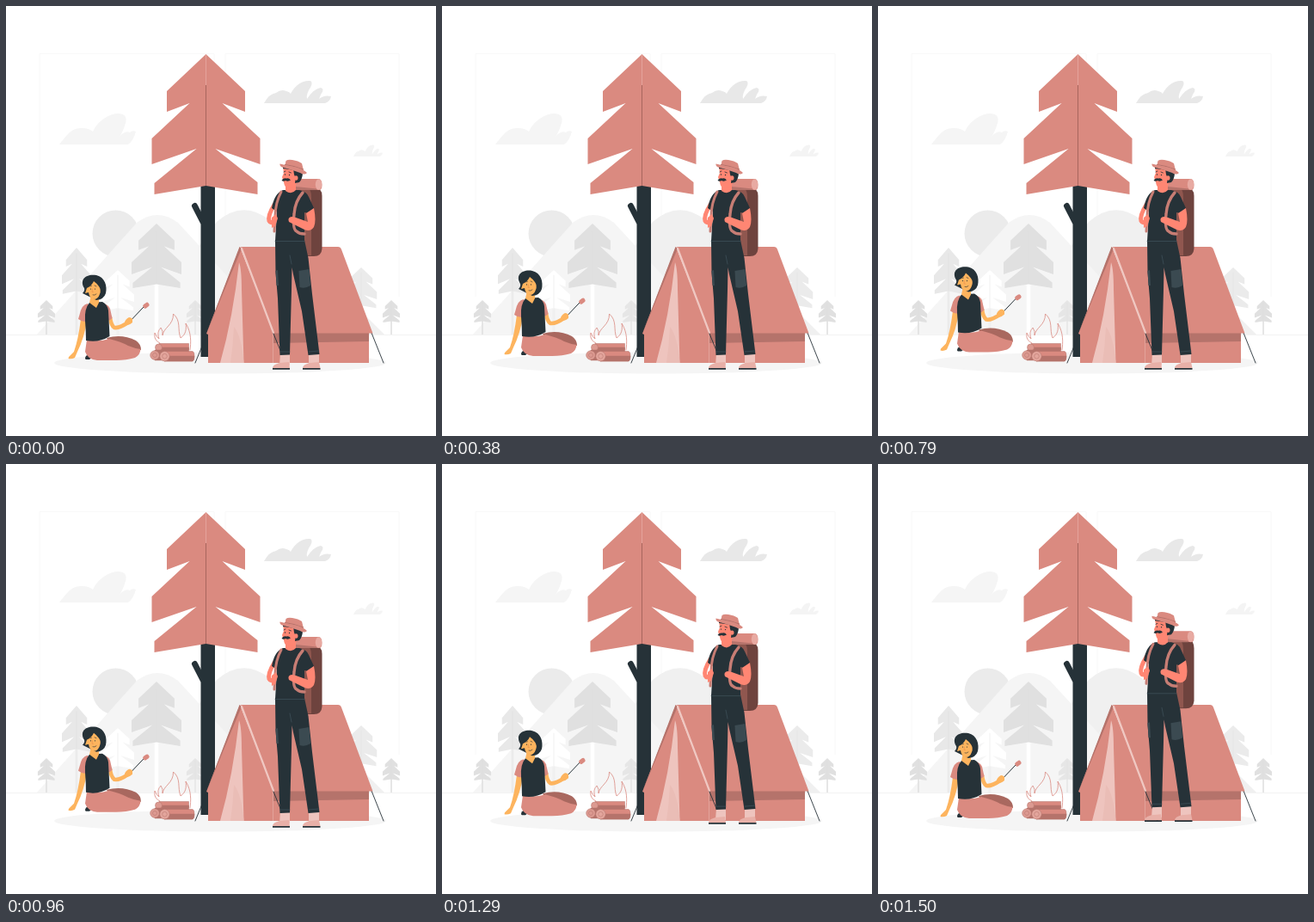
Write an HTML page that moves like this. It is 500 px wide and 500 px high and loops after 1.54 s.

```html
<!DOCTYPE html>
<html lang="en">
<head>
<meta charset="utf-8">
<title>Camping</title>
<style>
html, body { margin: 0; width: 100%; height: 100%; overflow: hidden; background: #fff; }
svg { display: block; width: 100%; height: 100%; }
.pink { fill: #da8a80; }
.deep { fill: #b5736b; }
.pale { fill: #eec4be; }
.dark { fill: #263238; }
.tan { fill: #fdb45e; }
.skin { fill: #ff8673; }
.line { fill: none; stroke-linecap: round; stroke-linejoin: round; }
</style>
</head>
<body>
<svg viewBox="0 0 500 500">
<defs>
  <path id="fir" d="M0 0L45.500 43V67L19 57L63 98V128L11 110L60 149V163L0 153L-60 163V150L-11 110L-63 128V98L-19 57L-45.500 67V43Z"/>
  <path id="puff" d="M0 0Q6 -11 14 -12Q20 -17 26 -14Q30 -13 31 -11C36 -21 45 -27 54 -26Q58 -24 52 -15Q49 -9 50 -5Q58 -17 66 -18Q71 -17 66 -10L64 -5Q70 -10 78 -8Q77 -2 71 0Z"/>
</defs>

<!-- backdrop -->
<path class="line" d="M39 338V55.500H242V338M255 338V55.500H457V338" stroke="#f8f8f8"/>
<path d="M62 161L70 151Q78 141 89 142Q96 142 101 146C107 133 120 125 131 125Q142 126 139 136Q136 147 131 153Q138 144 144 147Q147 144 151 146Q148 157 142 161Z" fill="#f5f5f5"/>
<use href="#puff" transform="translate(300 113)" fill="#e8e8e8"/>
<use href="#puff" transform="translate(404 175) scale(.435 .52)" fill="#f4f4f4"/>
<circle cx="127.500" cy="264.500" r="27" fill="#ebebeb"/>
<path d="M150 382L245 251Q276 224 308 250L440 382Z" fill="#f0f0f0"/>
<path d="M36 382L152 252Q176 234 200 252L320 382Z" fill="#f5f5f5"/>
<path d="M0 382.500H500" stroke="#f0f0f0" stroke-width=".8"/>
<g id="grove"></g>
<ellipse cx="249" cy="415" rx="193" ry="12.500" fill="#f5f5f5"/>

<!-- big tree -->
<path class="line" d="M219.500 232.500L229 251" stroke="#263238" stroke-width="7"/>
<path class="dark" d="M226.500 205H243V408H226.500Z"/>
<use href="#fir" class="pink" x="232.500" y="56"/>
<path d="M232.500 57V92" stroke="#e6aaa2" stroke-width=".8"/>
<path d="M232.500 92V209" stroke="#a3625a" stroke-width=".9"/>

<!-- tent -->
<g>
  <path class="line" d="M234 381L220 415M425 380L439 415" stroke="#263238" stroke-width=".9"/>
  <path class="pink" d="M311 380H422V415H311Z"/>
  <path class="deep" d="M310 379H422V390L311 392Z"/>
  <path class="pink" d="M273 280H386Q389 280 390 283L426.500 380.500H311Z"/>
  <path class="pink" d="M272 280L311 380V415H235V382L233 381Z"/>
  <path class="deep" d="M271.500 280L233 381L274 282Z"/>
  <path class="pale" d="M271 298Q274 306 274 330L276.500 415H249Q264 362 271 298Z"/>
  <path d="M265 373Q264 395 261 415H276.500Q274 384 265 373Z" fill="#eabdb6"/>
  <path class="line" d="M274 282L311 380" stroke="#f0c8c2" stroke-width="2.200"/>
  <path d="M310.500 381V415" stroke="#e5aaa2" stroke-width=".8"/>
  <path class="line" d="M311 381L325 415" stroke="#263238" stroke-width=".9"/>
</g>

<!-- fire -->
<path class="line" d="M179 392C171 388 173 382 173 380Q175 385 178 387C175 378 179 376 180 374Q183 378 182 383C183 374 195 371 194.500 358C204 366 199 376 203 386C209 382 210 376 209 369C216 380 215 392 214 400" stroke="#da8a80" stroke-width=".8"/>
<g stroke="#b5736b" stroke-width=".5">
  <path class="pink" d="M178 392.500H212.500V400H178Z"/>
  <path class="deep" d="M178 397H212.500V402H178Z"/>
  <circle cx="177.500" cy="397" r="4" fill="#dc9a91"/>
  <path class="deep" d="M173 400H186V412H173Z"/>
  <circle cx="173" cy="406" r="5.300" fill="#dc9a91"/>
  <path class="pink" d="M184 401.500H217Q219 402 219 407T217 413H184Z"/>
  <path class="deep" d="M184 407H219Q219 412 217 413H184Z"/>
  <circle cx="184.500" cy="407.200" r="5.700" fill="#e3a59c"/>
  <circle cx="184.500" cy="407.200" r="2.800" fill="none"/>
  <circle cx="173" cy="406" r="2.500" fill="none"/>
</g>

<!-- seated camper -->
<g id="woman">
  <path class="dark" d="M98 403L93 407Q91 410 93 411L97 411L103 406Z"/>
  <path d="M117 386Q135 381 151 389Q157 393 157 400L125 400Z" fill="#a9685f"/>
  <path class="pink" d="M94 388Q108 391 120 387Q133 390 142 395Q149 398 156.500 399Q156 406 150 409Q140 412 128 412H106Q95 411 92 402Z"/>
  <path class="tan" d="M87 364L94 366Q91 386 83 402L80 409Q76 411 72.500 410L73 408L79 402Q84 388 87 364Z"/>
  <path class="pink" d="M95 346Q88 347 85.500 359L84 364Q89 368 95 367L98 350Z"/>
  <path class="line" d="M121 362Q122 371 126 374Q132 375 142 368" stroke="#fdb45e" stroke-width="4.600"/>
  <path class="pink" d="M113 346Q119 347 121 352L123.500 363Q120 367 116 365Z"/>
  <path class="dark" d="M97 345L112 344Q118 347 119 354L120.500 384Q108 392 93 389Q93 378 92 366Q91 352 97 345Z"/>
  <path class="tan" d="M99 336H108V345L105 351L97 345Z"/>
  <path class="dark" d="M89 334Q92 331 91 328C85 318 93 311 105 313C115 315 118 326 116 334Q114 341 105 342Z"/>
  <path class="tan" d="M94 328Q100 325 102 320Q105 322 108 326Q111 330 109 335Q107 341 102 341Q97 340 96 333L92 334Z"/>
  <path class="line" d="M98 326L99.500 325.500M103 325L105 326M101 336Q103 337 105 335" stroke="#263238" stroke-width=".6"/>
  <circle cx="98.500" cy="329" r=".6" class="dark"/>
  <circle cx="103.500" cy="329" r=".6" class="dark"/>
  <path class="line" d="M100.500 329L100 332.500H101.500" stroke="#e58445" stroke-width=".5"/>
  <path class="line" d="M141 370L160 350" stroke="#263238" stroke-width="1"/>
  <path class="tan" d="M138 367Q141 362 144 362L147 363.500L147 368Q143 372 139 371Z"/>
  <rect class="pink" x="159" y="345.500" width="7.600" height="5.200" rx="2.200" transform="rotate(-36 163 348)"/>
</g>

<!-- hiker -->
<g id="man">
  <path d="M337 210H358Q367.500 211 367.500 221V282Q367 291 358 291H337Z" fill="#6e433e"/>
  <path d="M337 210H349Q355 213 355 222V290H337Z" fill="#90574f"/>
  <path class="pink" d="M336 201H364Q367.500 202 367.500 208T364 214L336 211Z"/>
  <ellipse cx="363.500" cy="207.500" rx="3.700" ry="6.300" fill="#e8aaa2"/>
  <path class="deep" d="M337 210L361 212.500V214H337Z"/>

  <!-- shoes and trousers -->
  <path class="pale" d="M319 404H330V418H318ZM352 404H364V418H352Z"/>
  <path fill="#e8b0a8" d="M310 421Q310 417 318 415L329 414L330 421ZM345 421Q345 417 353 415L364 414L365.500 421Z"/>
  <path class="dark" d="M310 421H330V422.700H310ZM345 421H365.500V422.700H345Z"/>
  <path class="dark" d="M313 272H347L351.500 293L356 335L364.500 405L351.500 406L344 355L334 312L332.500 304L332 330L330 405.500L318.500 406L316 340L313.500 310Z"/>
  <path d="M340.500 308L352.500 306L354 325Q348 329 341.500 327ZM313.500 308L316 307L317 325L314.500 325Z" fill="#3b4a51"/>
  <path class="line" d="M332 300L330 290M319 402H330M352 402L364 401" stroke="#455a64" stroke-width=".6"/>

  <!-- torso -->
  <path class="line" d="M312 231Q304 244 306 250Q308 254 312 249" stroke="#ff8673" stroke-width="5"/>
  <path class="dark" d="M322 214H341Q350 216 352 222L358 235L351 241L347 240L347 274H313L315 239L309 235Q312 218 322 214Z"/>
  <path class="skin" d="M325 204H337V214Q332 220 325 215Z"/>
  <path class="line" d="M320 216Q313 229 313 245L312 262" stroke="#c77d74" stroke-width="3"/>
  <path class="line" d="M345 217Q336 227 335 242Q333 260 338 262Q341 265 347 265" stroke="#c77d74" stroke-width="3.400"/>
  <path class="skin" d="M309 246L314 242L316 247L313 256L309 258Z"/>
  <path class="skin" d="M349 241L358 235Q361 250 358 257Q354 263 347 260L329 251Q327 246 332 245L337 246L351 251Z"/>
  <path class="line" d="M313 273.500H347" stroke="#455a64" stroke-width=".6"/>

  <!-- head -->
  <path class="skin" d="M322 187H339V204Q336 212 329 212Q324 212 323 205L321 199L323 194Z"/>
  <path class="dark" d="M334 189L345 193Q345 201 341 205L336 206Q337 199 335 196Z"/>
  <ellipse class="skin" cx="337.300" cy="200" rx="2.200" ry="2.700"/>
  <path class="dark" d="M320.500 203Q322 199.500 326 200.500Q329 199.500 331 202.500Q328 204.500 325 203Q323 204.500 320.500 203Z"/>
  <path class="line" d="M323 193L325 192M329 193L331.500 194" stroke="#263238" stroke-width=".8"/>
  <circle class="dark" cx="324.500" cy="196" r=".7"/>
  <circle class="dark" cx="329.500" cy="196.500" r=".7"/>
  <path class="dark" d="M322 186L336 189V191L322 189Z"/>
  <path class="pink" d="M324 187L325.500 180Q328 178 333 179Q340 180 344 183L346.500 193Z"/>
  <path class="line" d="M324.500 184.500Q336 186 345.500 190" stroke="#b5736b" stroke-width="1.200"/>
  <path class="pink" d="M318.500 183.500Q327 185.500 337 187.500Q346 190 350 194Q347 197 342 194Q330 189.500 321 187.500Q318 186 318.500 183.500Z"/>
</g>
</svg>
<script>
const LOOP = 1540, HALF = 750, RISE = 10, DELAY = 1000;
const $ = id => document.getElementById(id);

// x, tip y, x scale, y scale, crown colour, trunk colour
const firs = [
  [82, 281, .27, .33, '#e8e8e8', '#ebebeb'],
  [130, 307, .3, .29, '#fff', '#f0f0f0'],
  [175, 253, .46, .46, '#e0e0e0', '#fff'],
  [47, 342, .16, .16, '#e0e0e0', '#e0e0e0'],
  [220, 342, .16, .16, '#e6e6e6', '#e6e6e6'],
  [413, 304, .29, .29, '#ebebeb', '#ebebeb'],
  [448, 342, .16, .16, '#e0e0e0', '#e0e0e0']
];
$('grove').innerHTML = firs.map(([x, y, sx, sy, crown, trunk]) => {
  const w = 10 * sx, top = y + 140 * sy;
  return `<rect x="${x - w / 2}" y="${top}" width="${w}" height="${382 - top}" fill="${trunk}"/>
    <use href="#fir" transform="translate(${x} ${y}) scale(${sx} ${sy})" fill="${crown}"/>
    <path d="M${x} ${y + 20 * sy}V${y + 152 * sy}" stroke="#d8d8d8" stroke-width=".4"/>`;
}).join('');

// linear rise and fall
const lift = t => -RISE * Math.max(0, 1 - Math.abs(t - HALF) / HALF);
const shift = (id, y) => $(id).setAttribute('transform', `translate(0 ${y})`);

function draw(t) {
  shift('woman', lift(t));
  shift('man', lift(t - DELAY));
}

const start = performance.now();
function tick() {
  draw((performance.now() - start) % LOOP);
  requestAnimationFrame(tick);
}
tick();
</script>
</body>
</html>
```
